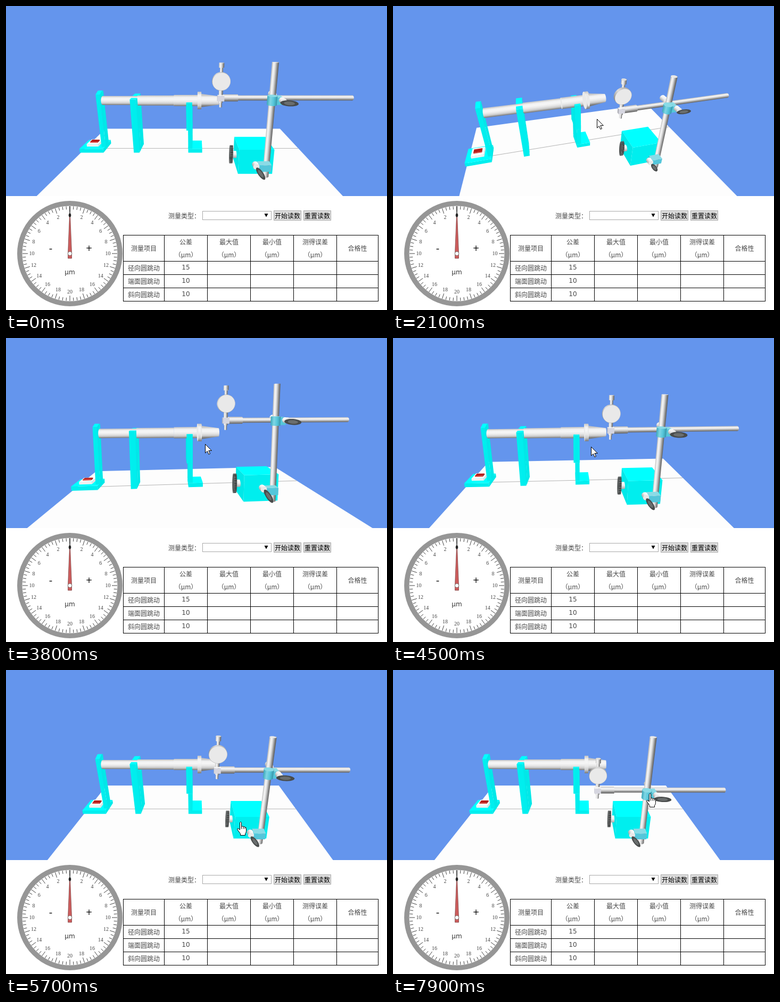
An HTML page with a canvas for the animation above (8000 ms loop, 716 by 571 pixels).

```html
<!DOCTYPE html>
<html lang="zh-CN">
<head>
<meta charset="utf-8">
<title>圆跳动测量</title>
<style>
html, body { margin: 0; width: 100%; height: 100%; overflow: hidden; background: #fff; }
canvas { display: block; }
</style>
</head>
<body>
<canvas id="stage" width="716" height="571"></canvas>
<script>
const ctx = document.getElementById('stage').getContext('2d');
const LOOP = 8000, STEP = 100, FOCAL = 431, CX = 358, CY = 178.5;
const CJK = '"Noto Sans CJK SC", "Noto Sans CJK", sans-serif';
const SANS = '"DejaVu Sans", sans-serif';

const clamp = (v, lo, hi) => Math.min(hi, Math.max(lo, v));

// The whole pose follows from the time: each drag adds its own share.
function pose(t) {
  const ramp = (from, to) => clamp((t - from) / (to - from), 0, 1);
  const easeOut = u => 1 - (1 - u) ** 3;

  const orbit = ramp(1200, 2100), back = ramp(2200, 3100);
  const dip = ramp(3100, 3600), swing = ramp(3600, 4000) - ramp(4000, 4300);
  const rise = ramp(4300, 4500), settle = ramp(4500, 5300);
  const yaw = 14.3 * (orbit - back) + 10 * swing + 2.8 * (rise - settle);
  const pitch = 15.06 + 14.4 * orbit - 8.9 * back - 13.7 * dip + 8.7 * rise + 6.5 * settle;

  const slide = -5 * ramp(5500, 5700) - 33 * ramp(5700, 6400) + 24 * easeOut(ramp(6500, 7100));
  const drop = 33 * ramp(7400, 7900);

  const enter = 1 - ramp(300, 1200), reach = ramp(5200, 5700), pull = ramp(5700, 6500);
  const climb = ramp(6600, 7100);
  const x = 369 + yaw + 380 * enter + 72 * reach - 7 * pull + 49 * climb;
  const y = 207 + 0.6 * (pitch - 20.6) - 165 * enter + 77 * reach - 7 * pull - 85 * climb + 1.2 * drop;
  return { yaw, pitch, slide, drop, x, y, hand: t >= 5500, shown: t >= 400 };
}

let sinY, cosY, sinP, cosP;
function aim(yaw, pitch) {
  const r = Math.PI / 180;
  sinY = Math.sin(yaw * r); cosY = Math.cos(yaw * r);
  sinP = Math.sin(pitch * r); cosP = Math.cos(pitch * r);
}
function project([x, y, z]) {
  const side = x * cosY + z * sinY, near = z * cosY - x * sinY;
  const k = FOCAL / (FOCAL - y * sinP - near * cosP);
  return [CX + side * k, CY - (y * cosP - near * sinP) * k];
}

function fill(pts, color) {
  ctx.beginPath();
  pts.forEach(p => ctx.lineTo(p[0], p[1]));
  ctx.closePath();
  ctx.fillStyle = color;
  ctx.fill();
}
function area(pts) {
  return pts.reduce((s, p, i) => {
    const q = pts[(i + 1) % pts.length];
    return s + p[0] * q[1] - q[0] * p[1];
  }, 0);
}
const turn = (n, f) => Array.from({ length: n }, (_, i) => f(Math.cos(i * 2 * Math.PI / n), Math.sin(i * 2 * Math.PI / n)));

// Convex outline in (y, z), extruded along x; colors are [top, front, side].
function prism(x0, x1, outline, colors) {
  const left = outline.map(([y, z]) => project([x0, y, z]));
  const right = outline.map(([y, z]) => project([x1, y, z]));
  outline.forEach((a, i) => {
    const j = (i + 1) % outline.length, b = outline[j];
    const quad = [left[i], left[j], right[j], right[i]];
    if (area(quad) > 0) fill(quad, colors[Math.abs(b[1] - a[1]) > Math.abs(b[0] - a[0]) ? 0 : 1]);
  });
  if (area(left) < 0) fill(left, colors[2]);
  if (area(right) > 0) fill(right, colors[2]);
}
function box(x0, x1, y0, y1, z0, z1, colors) {
  prism(x0, x1, [[y0, z1], [y1, z1], [y1, z0], [y0, z0]], colors);
}

const AXES = { x: [1, 2, 0], y: [2, 0, 1], z: [0, 1, 2] };
function ring(center, r, axis) {
  const [u, v] = AXES[axis];
  return turn(32, (c, s) => {
    const p = center.slice();
    p[u] += r * c;
    p[v] += r * s;
    return project(p);
  });
}
// Round bar or cone, shaded across its screen direction.
function rod(axis, start, length, r, tones, cap, r2 = r) {
  const end = start.slice();
  end[AXES[axis][2]] += length;
  const a = ring(start, r, axis), b = ring(end, r2, axis);
  const pa = project(start), pb = project(end);
  const dx = pb[0] - pa[0], dy = pb[1] - pa[1], len = Math.hypot(dx, dy) || 1;
  const n = [-dy / len, dx / len];
  const dot = p => p[0] * n[0] + p[1] * n[1];
  const edges = pts => {
    const s = pts.slice().sort((p, q) => dot(p) - dot(q));
    return [s[0], s[s.length - 1]];
  };
  const [a0, a1] = edges(a), [b0, b1] = edges(b);
  const mid = [(pa[0] + pb[0]) / 2, (pa[1] + pb[1]) / 2];
  const half = (dot(a1) - dot(a0) + dot(b1) - dot(b0)) / 4;
  const g = ctx.createLinearGradient(mid[0] - n[0] * half, mid[1] - n[1] * half,
    mid[0] + n[0] * half, mid[1] + n[1] * half);
  tones.forEach((c, i) => g.addColorStop(i / (tones.length - 1), c));
  fill(a, g);
  fill(b, g);
  fill([a0, b0, b1, a1], g);
  if (area(a) > 0) fill(a, cap);
  if (area(b) < 0) fill(b, cap);
}
// Flat oval thumb screw facing the viewer.
function wing(x, y, z, rx, ry, tilt) {
  const ct = Math.cos(tilt), st = Math.sin(tilt);
  const oval = k => turn(28, (c, s) =>
    project([x + k * (rx * c * ct - ry * s * st), y + k * (rx * c * st + ry * s * ct), z]));
  fill(oval(1), '#484b4b');
  fill(oval(0.6), '#6a6e6e');
}

const CYAN = ['#00ffff', '#00eeee', '#00e8e8'];
const TEAL = ['#8adbe6', '#55c6da', '#3fb0c4'];
const WHITE = ['#ffffff', '#f1f1f1', '#e2e2e2'];
const RED = ['#b81c18', '#d8443c', '#8e0d0d'];
const DARK = ['#585c5c', '#484b4b', '#525656'];
const SHAFT = ['#c4c4c4', '#f2f2f2', '#f6f6f6', '#e8e8e8', '#cccccc', '#777777'];
const METAL = ['#bcbcbc', '#f8f8f8', '#dddddd', '#9a9a9a', '#606060'];
const BUSH = ['#3aa6ba', '#7fd6e4', '#55c6da', '#3796a8'];
const HUB = ['#ffffff', '#eeeeee', '#aaaaaa'];
const CAP = '#e9e9e9';

function table() {
  const left = -225, right = 206, y = -101;
  fill([[left, y, -113], [right, y, -113], [right, y, 260], [left, y, 260]].map(project), '#fdfdfd');
  ctx.strokeStyle = '#b4b4b4';
  ctx.lineWidth = 1;
  ctx.beginPath();
  ctx.moveTo(...project([left, y, -7]));
  ctx.lineTo(...project([right, y, -7]));
  ctx.stroke();
}

function shaft() {
  let x = -176;
  const section = (len, r, r2) => {
    rod('x', [x, 1, 0], len, r, SHAFT, CAP, r2);
    x += len;
  };
  section(66, 8.5);
  section(68, 9.5);
  section(44, 10.5);
  section(7, 16.5);
  section(33, 12.5, 8);
}

function bench() {
  box(-227, -181, -101, -93, -30, 11, CYAN);
  box(-217, -194, -93, -88, -22, 1, WHITE);
  box(-213, -198, -88, -86, -16, -6, RED);
  prism(-187, -179, [[-93, 3], [13, 3], [18, -9], [17, -14], [-93, -14]], CYAN);
  box(-122, -111, -101, 8, -27, 0, CYAN);
  box(-16, 11, -101, -93, -27, 11, CYAN);
  box(-16, -8, -93, -55, -27, 11, CYAN);
  box(-19, -8, -55, 0, -27, 11, CYAN);
  shaft();
  box(-122, -111, -101, 6, 0, 11, CYAN);
  box(-19, -8, -55, -1, 6, 11, CYAN);
}

function magnet(dx) {
  box(68 + dx, 124 + dx, -101, -57.5, 34, 84, CYAN);
  rod('x', [62 + dx, -79, 59], 6, 6, HUB, CAP);
  prism(57 + dx, 62 + dx, turn(24, (c, s) => [-79 - 17 * c, 59 + 6 * s]), DARK);
}

function indicator(x, y) {
  const stem = (from, h, r) => rod('y', [x, y + from, 92], h, r, METAL, '#dddddd');
  stem(-14, 8, 2);
  stem(-7, 20, 3);
  stem(34, 10, 2.2);
  stem(44, 6.5, 3.7);
  box(x - 5, x + 5, y - 4.5, y + 4, 90, 95, ['#f4f4f4', '#d6d6e0', '#b0b0b8']);
  rod('z', [x, y + 24.5, 90], 5, 13, ['#aaaaaa', '#dddddd', '#888888'], '#c8c8c8');
  fill(ring([x, y + 24.5, 95], 12.6, 'z'), CAP);
}

function stand(dx, drop) {
  const y = 29.5 - drop, post = 106.5 + dx;
  magnet(dx);
  rod('z', [post + 7, y + 3, 76], 12, 4.5, HUB, CAP);
  rod('x', [60 + dx, y, 92], 167, 3.8, METAL, '#dddddd');
  rod('x', [39 + dx, y, 92], 21, 5.2, METAL, CAP);
  rod('y', [post, -92, 104], 174, 4.5, METAL, CAP);

  box(post - 13, post + 6, -81, -70, 98, 110, TEAL);
  rod('z', [post - 18, -70, 106], 8, 4.5, HUB, CAP);
  wing(post - 12, -79, 118, 12, 3.8, -0.98);

  box(post, post + 13, y - 6, y + 5, 97, 109, TEAL);
  rod('y', [post, y - 7, 104], 13, 6.8, BUSH, TEAL[0]);
  rod('z', [post + 12, y + 1, 108], 8, 4, HUB, CAP);
  wing(post + 19, y - 1, 118, 12.5, 4.2, -0.08);

  indicator(35.3 + dx, y);
}

const ARROW = new Path2D('M0 0V16.5L3.8 13L6.4 19L9 17.9L6.4 12H11.8Z');
const HAND = new Path2D('M0 1.5C0 -.6 3 -.6 3 1.5V8L5 8.2Q6.6 7.6 7 9Q9 8 9.8 10Q12 9.4 12 12V17Q12 20 10 22V25H1V22L-4.5 14.5Q-5.6 12.4 -3.6 12L0 14.5Z');
const FINGERS = new Path2D('M3 8V13M6.5 9V13M9.5 10V13');
function cursor(x, y, hand) {
  const path = hand ? HAND : ARROW;
  ctx.save();
  ctx.translate(Math.round(x) + (hand ? -1.5 : 0.5), Math.round(y) + 0.5);
  ctx.lineWidth = 1;
  ctx.strokeStyle = '#000';
  ctx.fillStyle = '#fff';
  ctx.fill(path);
  ctx.stroke(path);
  if (hand) ctx.stroke(FINGERS);
  ctx.restore();
}

function label(s, x, y, font, color = '#484848') {
  ctx.font = font;
  ctx.fillStyle = color;
  ctx.fillText(s, x, y);
}

function gauge() {
  ctx.save();
  ctx.translate(120, 465);
  ctx.strokeStyle = '#969696';
  ctx.lineWidth = 9.5;
  ctx.beginPath();
  ctx.arc(0, 0, 94.2, 0, 7);
  ctx.stroke();
  ctx.strokeStyle = '#444';
  ctx.lineWidth = 1;
  turn(80, (c, s) => [c, s]).forEach(([c, s], i) => {
    const r = i % 4 ? 83 : 79;
    ctx.beginPath();
    ctx.moveTo(s * 89, -c * 89);
    ctx.lineTo(s * r, -c * r);
    ctx.stroke();
  });
  turn(20, (c, s) => [c, s]).forEach(([c, s], i) => {
    if (i) label(Math.min(i, 20 - i) * 2, s * 71.5, 0.5 - c * 71.5, '10px "Liberation Serif", serif', '#444');
  });
  label('-', -36, -9, '18px ' + SANS, '#000');
  label('+', 36, -9, '15px ' + SANS, '#000');
  label('μm', 0, 36, '12px ' + SANS, '#333');
  ctx.fillStyle = '#333';
  ctx.fillRect(-0.75, -89, 1.5, 20);
  ctx.strokeStyle = '#6e3a3a';
  ctx.lineWidth = 0.7;
  fill([[-0.6, -70], [0.6, -70], [3.5, 0], [3.5, 9], [-3.5, 9], [-3.5, 0]], '#cd5c5c');
  ctx.stroke();
  fill(turn(20, (c, s) => [2.3 * c, 3.6 * s - 72]), '#222');
  fill(turn(24, (c, s) => [3.7 * c, 3.7 * s]), '#fff');
  ctx.strokeStyle = '#777';
  ctx.lineWidth = 1;
  ctx.stroke();
  ctx.restore();
}

function frame(x, y, w, h, bg) {
  ctx.fillStyle = bg;
  ctx.fillRect(x, y, w, h);
  ctx.strokeStyle = '#a9a9a9';
  ctx.lineWidth = 1;
  ctx.strokeRect(x + 0.5, y + 0.5, w - 1, h - 1);
}

function form() {
  const cjk = '12px ' + CJK;
  label('测量类型：', 335, 394, cjk);
  frame(369, 385, 130, 17, '#fff');
  fill([[485.5, 390], [492.5, 390], [489, 396.5]], '#000');
  ['开始读数', '重置读数'].forEach((s, i) => {
    frame(503 + 56 * i, 384, 52, 19, '#dddddd');
    label(s, 529 + 56 * i, 394.5, cjk, '#000');
  });

  const col = i => clamp(216 + 81 * i, 220, 699);
  const mid = i => (col(i) + col(i + 1) + 1) / 2;
  ctx.fillStyle = '#000';
  for (let i = 0; i < 7; i++) ctx.fillRect(col(i), 430, 1, 125);
  for (let i = 0; i < 4; i++) ctx.fillRect(220, 479 + 25 * i, 480, 1);
  ctx.fillRect(220, 430, 480, 1);
  ['测量项目', '公差', '最大值', '最小值', '测得误差', '合格性'].forEach((s, i) => {
    const single = i === 0 || i === 5;
    label(s, mid(i), single ? 455 : 443, cjk);
    if (!single) label('（μm）', mid(i), 467, cjk);
  });
  ['径向', '端面', '斜向'].forEach((s, i) => {
    label(s + '圆跳动', mid(0), 492.5 + i * 25, cjk);
    label(i ? 10 : 15, mid(1), 492 + i * 25, '12px ' + SANS);
  });
}

function draw(t) {
  const p = pose(t);
  ctx.fillStyle = '#fff';
  ctx.fillRect(0, 0, 716, 571);
  ctx.textAlign = 'center';
  ctx.textBaseline = 'middle';
  gauge();
  form();

  ctx.save();
  ctx.beginPath();
  ctx.rect(0, 0, 716, 357);
  ctx.clip();
  ctx.fillStyle = '#6495ed';
  ctx.fillRect(0, 0, 716, 357);
  aim(p.yaw, p.pitch);
  table();
  bench();
  stand(p.slide, p.drop);
  if (p.shown) cursor(p.x, p.y, p.hand);
  ctx.restore();
}

const begin = performance.now();
function tick(now) {
  const t = Math.max(0, now - begin) % LOOP;
  draw(Math.floor(t / STEP) * STEP);
  requestAnimationFrame(tick);
}
draw(0);
requestAnimationFrame(tick);
</script>
</body>
</html>
```
